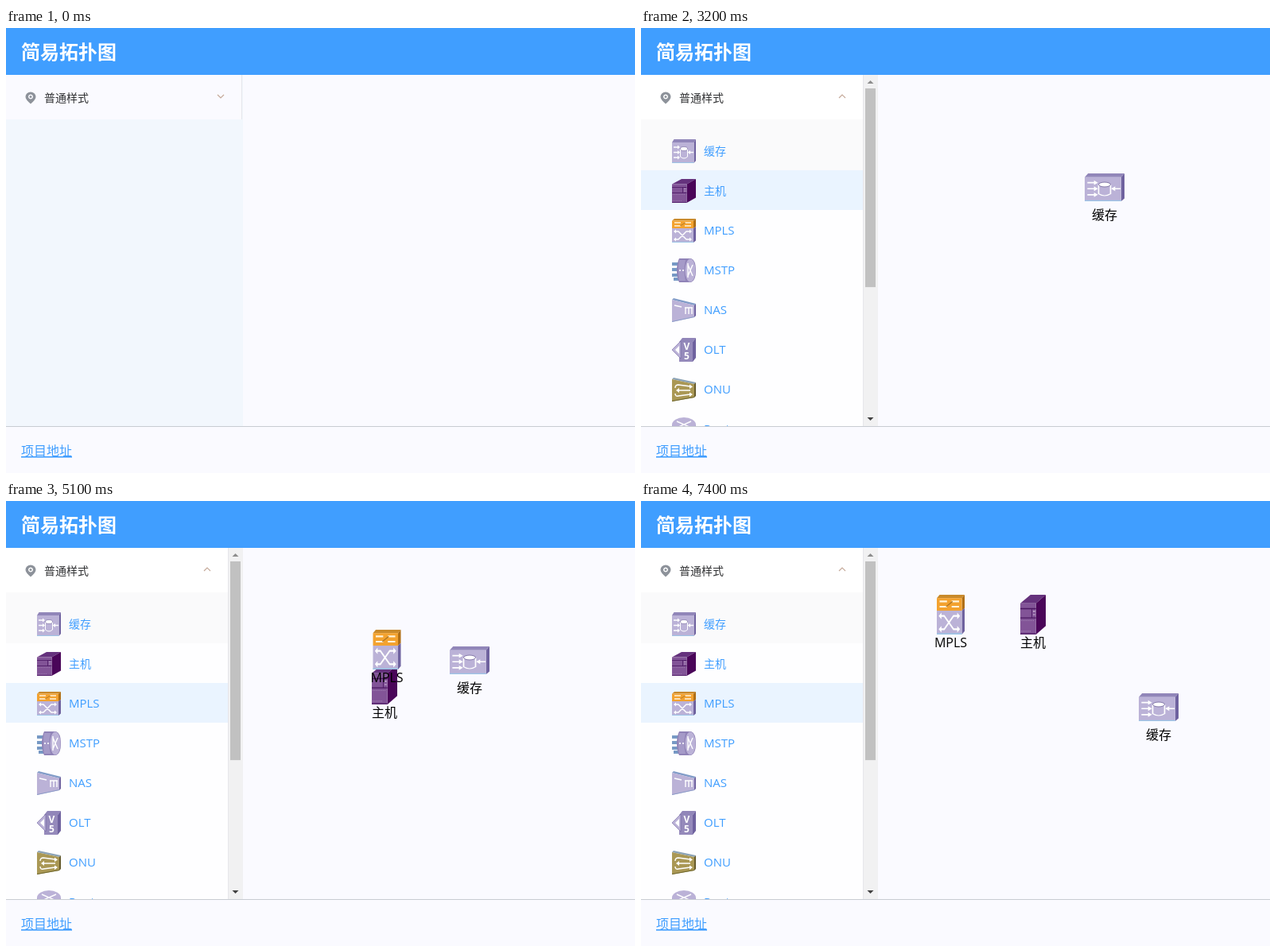
These frames come from a looping animation (791x560 px, 8 s). An HTML page:

```html
<!DOCTYPE html>
<html lang="zh-CN">
<head>
<meta charset="utf-8">
<title>简易拓扑图</title>
<style>
  html, body { margin: 0; width: 100%; height: 100%; overflow: hidden; background: #fafaff; }
  svg { display: block; font: 14px "Open Sans", "Noto Sans CJK SC", sans-serif; }
  .line { fill: none; stroke: #fff; stroke-width: 1.4; }
  .lilac { fill: #bbb2d7; }
  .top { fill: #9186b9; }
  .side { fill: #6f629f; }
  .label { font-size: 16px; text-anchor: middle; }
  .item { fill: #409eff; }
</style>
</head>
<body>
<svg width="791" height="560" viewBox="0 0 791 560">
  <defs>
    <clipPath id="view"><rect id="viewBox" y="115" width="280"/></clipPath>

    <!-- Icons live in a 30 by 30 box -->
    <g id="cache">
      <path class="top" d="M0 4L2.500 0H30L27.500 4z"/>
      <path class="side" d="M27.500 4L30 0V27L27.500 30z"/>
      <path class="lilac" d="M0 4H27.500V30H0z"/>
      <path d="M0 29.500H27.500" stroke="#9cc4e6"/>
      <path class="line" d="M2 10H8M2 16.500H8M2 23H8M20.500 16.500H27"/>
      <path fill="#fff" d="M7 7.500L10 10L7 12.500zM7 14L10 16.500L7 19zM7 20.500L10 23L7 25.500zM23 14L20 16.500L23 19z"/>
      <path class="lilac" stroke="#fff" d="M10.500 12V22Q15 26 19.500 22V12"/>
      <ellipse cx="15" cy="12" rx="4.500" ry="2.500" fill="#fff" stroke="#62558f" stroke-width=".5"/>
    </g>
    <g id="host">
      <path fill="#65327d" d="M0 6.500L12 0H30L18.500 6.500z"/>
      <path fill="#4a0659" d="M18.500 6.500L30 0V23.500L18.500 30z"/>
      <path fill="#825497" d="M0 6.500H18.500V30H0z"/>
      <path d="M0 10.500H18.500M0 17.500H18.500M13.500 10.500V17.500M0 29.500H18.500" stroke="#4b1762" stroke-width=".8"/>
      <path d="M1 19.500H17M1 27.500H13" stroke="#a485b6" stroke-dasharray="1 1" stroke-width=".7"/>
      <path d="M15 12.500H17.500M15 15H17.500" stroke="#d1bedb" stroke-width=".7"/>
    </g>
    <g id="mpls">
      <path fill="#c98a2b" d="M0 2.500L3 0H30L27 2.500z"/>
      <path fill="#b06f16" d="M27 2.500L30 0V10L27 12z"/>
      <path fill="#f3a22f" d="M0 2.500H27V12H0z"/>
      <path class="side" d="M27 12L30 10V27.500L27 30z"/>
      <path class="lilac" d="M0 12H27V30H0z"/>
      <path d="M0 29.500H27" stroke="#9cc4e6"/>
      <path d="M3 5H11M16 5H24M3 9H11M16 9H24" stroke="#fff4dc" stroke-width="1.300"/>
      <path d="M10 9L17 5" stroke="#a87324" stroke-width=".8"/>
      <path class="line" d="M4 16H8L18 26H23M4 26H8L18 16H23"/>
      <path fill="#fff" d="M22 13.500L25 16L22 18.500zM22 23.500L25 26L22 28.500zM5 13.500L2 16L5 18.500zM5 23.500L2 26L5 28.500z"/>
    </g>
    <g id="mstp">
      <path d="M0 7H9M0 14H9M0 21H9M2 26H9" stroke="#7799c5" stroke-width="4"/>
      <path fill="#9083b7" d="M9 0H24Q30 2 30 15T24 30H9Q6 24 6 15T9 0z"/>
      <ellipse class="lilac" cx="23" cy="15" rx="6.500" ry="14.500"/>
      <path fill="#a59ac8" d="M9 2H17Q14 15 17 28H9Q7 15 9 2z"/>
      <path class="line" d="M20 8L26 22M20 22L26 8M20 6V24"/>
      <path class="line" stroke-dasharray="2 2" d="M9 15H17"/>
    </g>
    <g id="nas">
      <path fill="#819cc8" d="M0 2L2 0L30 7L28 9z"/>
      <path class="side" d="M28 9L30 7V22L28 24z"/>
      <path class="lilac" d="M0 2L28 9V24L0 30z"/>
      <path d="M0 29.500L28 23.500" stroke="#8c9dc9"/>
      <path class="line" d="M3 9L12 11M16 12H26M17 12V20M21 12V20M25 12V20"/>
    </g>
    <g id="olt">
      <path class="top" d="M9 5L13 0H30L26 5z"/>
      <path class="side" d="M26 5L30 0V25L26 30z"/>
      <path fill="#958abb" d="M9 5H26V30H9z"/>
      <path class="lilac" stroke="#6f629f" stroke-width=".6" d="M0 15L11 4V26z"/>
      <path fill="#fff" d="M4 15L9 10V20z"/>
      <g fill="#fff" font-size="12" font-weight="700" text-anchor="middle">
        <text x="18.500" y="15">V</text><text x="18.500" y="27">5</text>
      </g>
    </g>
    <g id="onu">
      <path fill="#8ba2b5" d="M0 2L2 0L30 6L28 8z"/>
      <path fill="#665b2c" d="M28 8L30 6V23L28 25z"/>
      <path fill="#aa9855" d="M0 2L28 8V25L0 30z"/>
      <path d="M0 29.500L28 24.500" stroke="#6f672f"/>
      <path class="line" d="M23 11L8 9Q4 9 4 13M8 16H23M4 20Q4 24 8 23L23 21"/>
      <path fill="#fff" d="M22 8.500L26 11.500L22 14zM9 13L5 16L9 19zM22 18.500L26 21L22 24z"/>
    </g>
    <g id="router">
      <path fill="#8d82b5" d="M0 9V22Q15 36 30 22V9z"/>
      <ellipse class="lilac" cx="15" cy="9" rx="15" ry="9"/>
      <path class="line" d="M6 5L24 13M24 5L6 13"/>
    </g>
  </defs>

  <rect width="791" height="560" fill="#fafaff"/>
  <rect y="59" width="298" height="442" fill="#f2f7fd"/>

  <g clip-path="url(#view)">
    <rect y="115" width="280" height="386" fill="#fefeff"/>
    <rect y="115" width="280" height="64" fill="#fafafb"/>
    <rect id="hover" width="280" height="50" fill="#eaf4ff"/>
    <g id="list"></g>
  </g>

  <rect id="menu" y="59" height="56"/>
  <path id="edge" stroke="#e6e6ea"/>
  <path fill="#8d929a" fill-rule="evenodd" d="M31 95.500Q24.500 90 24.500 86.500A6.500 6 0 0 1 37.500 86.500Q37.500 90 31 95.500zM31 83.500a3 3 0 1 0 .01 0z"/>
  <circle cx="31" cy="86.500" r="1.500" fill="#8d929a"/>
  <text x="48" y="93" fill="#303133">普通样式</text>
  <path id="arrow" d="M-4 -2L0 2L4 -2" fill="none" stroke="#c5a999" stroke-width="1.200"/>

  <g id="bar">
    <rect x="280" y="59" width="18" height="442" fill="#f1f1f2"/>
    <rect id="thumb" x="282" y="76" width="13" fill="#c1c1c1"/>
    <path d="M284.500 70L288.500 66L292.500 70z" fill="#8c8c8c"/>
    <path d="M284.500 490L288.500 494L292.500 490z" fill="#404040"/>
  </g>

  <g id="nodes"></g>
  <g id="ghost" opacity=".66"></g>

  <rect width="791" height="59" fill="#409eff"/>
  <text x="19" y="39" fill="#fff" font-size="24" font-weight="700">简易拓扑图</text>
  <rect y="501" width="791" height="59" fill="#fafaff"/>
  <path d="M0 501.500H791" stroke="#c8ccd2"/>
  <text x="19" y="538" fill="#409eff" font-size="16" text-decoration="underline">项目地址</text>
</svg>
<script>
const $ = id => document.getElementById(id);
const set = (el, attrs) => { for (const k in attrs) el.setAttribute(k, attrs[k]); };
const clamp = v => Math.min(1, Math.max(0, v));

const kinds = [['cache', '缓存'], ['host', '主机'], ['mpls', 'MPLS'], ['mstp', 'MSTP'],
  ['nas', 'NAS'], ['olt', 'OLT'], ['onu', 'ONU'], ['router', 'Router']];

const row = ([icon, name], x, y) => `<use href="#${icon}" x="${x}" y="${y + 11}"/>
  <text class="item" x="${x + 40}" y="${y + 31}" font-size="${/\w/.test(name) ? 15 : 14}">${name}</text>`;
$('list').innerHTML = kinds.map((kind, i) => row(kind, 39, 129 + 50 * i)).join('');

// Dropped nodes: size, label baseline, drop time, start, end, move times
const nodes = [
  { w: 50, h: 35, base: 58, drop: 2500, a: [558, 183], b: [626, 242], t0: 7100, t1: 7400 },
  { w: 32, h: 50, base: 66, drop: 4000, a: [460, 206], b: [477, 118], t0: 6600, t1: 6800 },
  { w: 35, h: 50, base: 66, drop: 5100, a: [461.5, 162], b: [372, 118], t0: 5800, t1: 6200 }
];
$('nodes').innerHTML = nodes.map((n, i) => `<g>
  <use href="#${kinds[i][0]}" transform="scale(${n.w / 30} ${n.h / 30})"/>
  <text class="label" x="${n.w / 2}" y="${n.base}">${kinds[i][1]}</text></g>`).join('');
nodes.forEach((n, i) => n.el = $('nodes').children[i]);

// Drag image: from, until, kind, x, y
const drags = [
  [2100, 2200, 0, 249, 151], [2200, 2500, 0, 461, 147],
  [3600, 3700, 1, 39, 173], [3700, 3800, 1, 250, 141], [3800, 4000, 1, 357, 167],
  [4700, 4800, 2, 79, 225], [4800, 4900, 2, 288, 196], [4900, 5100, 2, 310, 130]
];
$('ghost').innerHTML = drags.map(([, , k, x, y]) =>
  `<g><rect x="${x}" y="${y}" width="195" height="50" fill="#eaf5ff"/>${row(kinds[k], x, y)}</g>`).join('');

function draw(t) {
  const p = clamp((t - 1135) / 300);
  const ease = p < .5 ? 2 * p * p : 1 - 2 * (1 - p) ** 2;
  const open = 665 * ease, content = 56 + open;
  const scrolls = content > 442, width = scrolls ? 280 : 297;

  set($('viewBox'), { height: Math.min(386, open), width });
  set($('menu'), { width, fill: t >= 900 && t < 1600 ? '#ecf4ff' : p ? '#fff' : '#fafaff' });
  set($('edge'), { d: `M${width - .5} 59V${Math.min(501, 59 + content)}` });
  set($('arrow'), { transform: `translate(${width - (scrolls ? 27 : 27)} 86) rotate(${180 * (1 - (1 - p) ** 2)})` });
  set($('bar'), { visibility: scrolls ? 'visible' : 'hidden' });
  set($('thumb'), { height: 408 * 442 / Math.max(442, content) });

  const hovered = t < 1600 ? -9 : t < 3200 ? 0 : t < 4300 ? 1 : 2;
  set($('hover'), { y: 129 + 50 * hovered });

  for (const n of nodes) {
    const k = clamp((t - n.t0) / (n.t1 - n.t0));
    const [x, y] = n.a.map((v, i) => v + (n.b[i] - v) * k);
    set(n.el, { transform: `translate(${x} ${y})`, visibility: t >= n.drop ? 'visible' : 'hidden' });
  }
  drags.forEach(([from, until], i) =>
    set($('ghost').children[i], { visibility: t >= from && t < until ? 'visible' : 'hidden' }));
}

function tick(now) {
  draw(Math.floor(now % 8000 / 100) * 100);
  requestAnimationFrame(tick);
}
draw(0);
requestAnimationFrame(tick);
</script>
</body>
</html>
```
